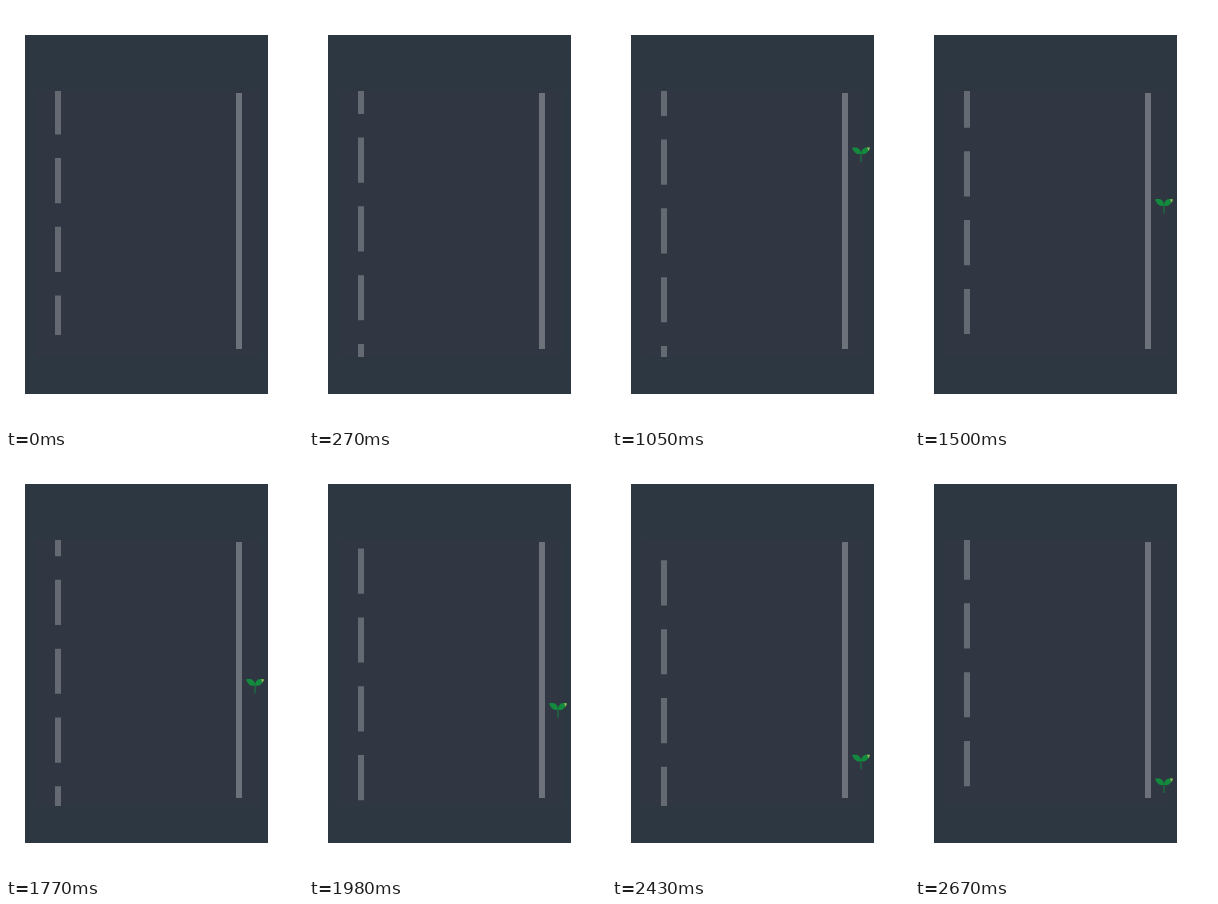
These frames come from a looping animation (297 px wide and 421 px high, 2700 ms). An HTML page:

```html
<!DOCTYPE html>
<html lang="en">
<head>
<meta charset="utf-8">
<title>Sprout track</title>
<style>
  html, body { margin: 0; width: 100%; height: 100%; overflow: hidden; background: #fff; }
  svg { display: block; width: 297px; height: 421px; }
</style>
</head>
<body>
<svg viewBox="0 0 297 421">
  <defs>
    <clipPath id="lane"><rect x="49" y="85" width="6" height="266"/></clipPath>
  </defs>
  <rect x="19" y="29" width="243" height="359" fill="#2d3741"/>
  <rect x="29" y="84" width="224" height="267" fill="#303642"/>
  <g clip-path="url(#lane)"><path id="dashes" fill="#656a72"/></g>
  <rect x="230" y="87" width="6" height="256" fill="#6d727a"/>
  <g id="sprout" visibility="hidden">
    <path d="M249 5.5V15" stroke="#1d6840" stroke-width="1.5" fill="none"/>
    <path d="M249 6.6C246.8 8.2 242.4 7.2 240 0.8C244.5 -0.3 248.6 0.6 249 6.6Z" fill="#138a3e"/>
    <path d="M249 6.6C251.2 8.2 255.6 7.2 258 0.8C253.5 -0.3 249.4 0.6 249 6.6Z" fill="#138a3e"/>
    <path d="M255.2 0.3L258 0.8Q257.4 2.8 256.2 4Z" fill="#9cb85a"/>
  </g>
</svg>
<script>
  const LOOP = 2700, STEP = 30;
  const PERIOD = 68.8, DASH = 45.2, TOP = 85, BOTTOM = 351;
  const dashes = document.getElementById('dashes');
  const sprout = document.getElementById('sprout');

  function drawDashes(t) {
    const shift = 0.179 * t;
    const end = Math.min(BOTTOM, 329 + shift); // the strip itself slides into the lane
    let d = '';
    for (let y = TOP - PERIOD + (67 + shift) % PERIOD; y < end; y += PERIOD) {
      d += `M49 ${y}h6V${Math.min(y + DASH, end)}h-6Z`;
    }
    dashes.setAttribute('d', d);
  }

  function drawSprout(t) {
    const y = Math.min(323, 141 + 0.1147 * (t - 1050));
    sprout.setAttribute('visibility', t >= 600 ? 'visible' : 'hidden');
    sprout.setAttribute('transform', `translate(0 ${y})`);
  }

  const start = performance.now();
  function frame() {
    const t = Math.floor((performance.now() - start) % LOOP / STEP) * STEP;
    drawDashes(t);
    drawSprout(t);
    requestAnimationFrame(frame);
  }
  frame();
</script>
</body>
</html>
```
